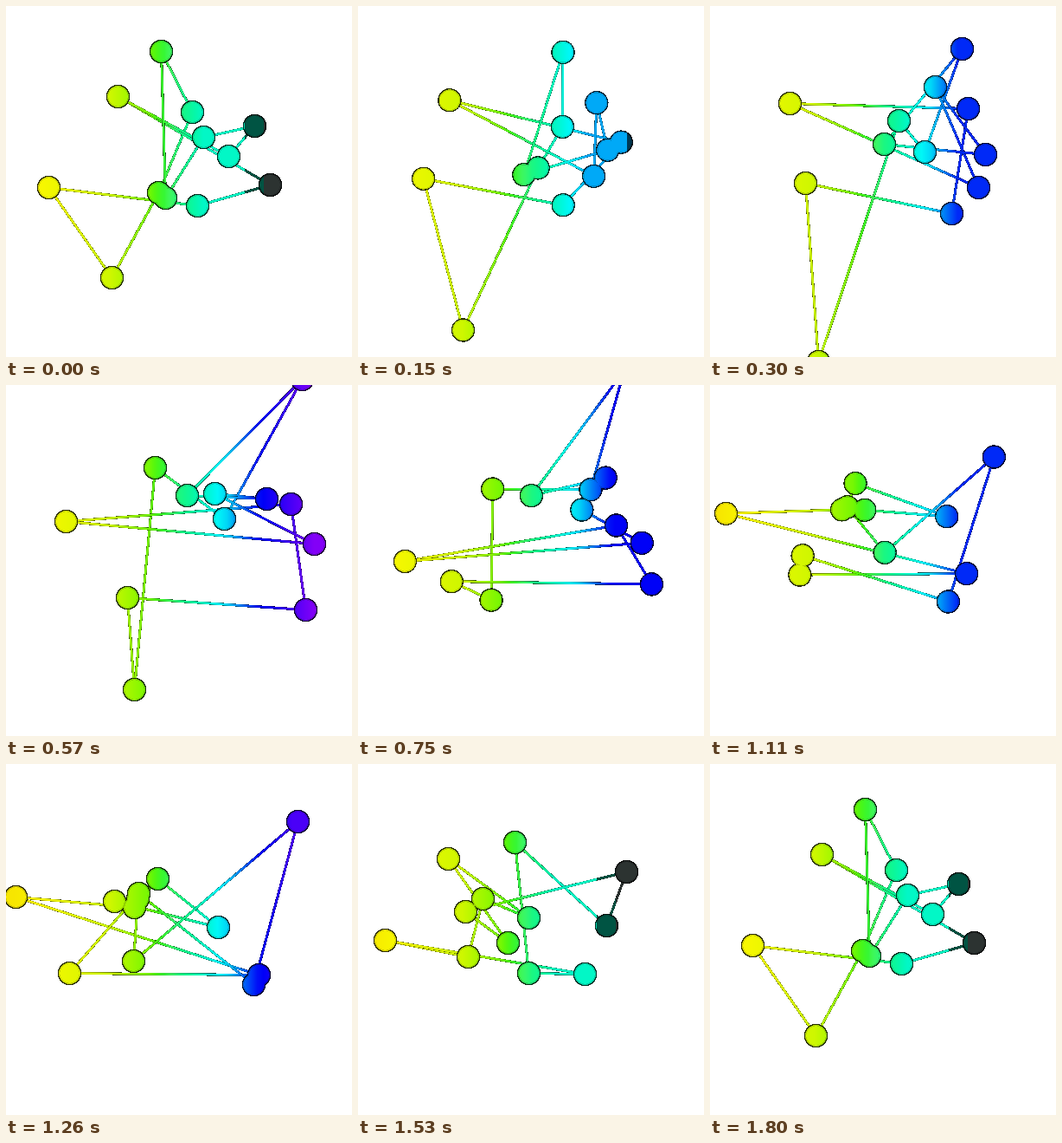
Animation, 400 px wide and 405 px high, one loop 1830 ms. Source, as a matplotlib script:

```python
import numpy as np
import matplotlib.pyplot as plt
from matplotlib.animation import FuncAnimation
from matplotlib.colors import hsv_to_rgb

W, H, DPI = 400, 405, 100
STEPS, MS = 60, 30
BALL, RIM, ROD = 13.7, 1.3, 1.55

# Key times as fractions of the cycle, and where each joint of the chain is.
KEYS = np.array([0, 10, 19, 32, 42, 51]) / STEPS
JOINTS = [
    [(179, 52), (291, 49), (342, -7), (224, 42), (125, 158), (104, 109)],
    [(215, 122), (248, 168), (252, 154), (284, 117), (245, 188), (197, 177)],
    [(176, 215), (218, 132), (172, 95), (167, 147), (175, 132), (144, 155)],
    [(122, 313), (125, 410), (148, 351), (152, 154), (148, 165), (127, 222)],
    [(49, 209), (110, 204), (140, 245), (47, 171), (11, 153), (31, 203)],
    [(221, 230), (279, 239), (346, 259), (307, 200), (292, 243), (262, 242)],
    [(305, 206), (298, 118), (329, 137), (188, 190), (73, 241), (197, 241)],
    [(129, 104), (92, 112), (69, 157), (67, 223), (153, 149), (181, 90)],
    [(257, 173), (310, 209), (356, 183), (281, 218), (286, 254), (287, 186)],
    [(287, 138), (260, 93), (241, 125), (301, 120), (337, 66), (310, 124)],
    [(228, 151), (318, 171), (301, 131), (252, 136), (147, 227), (124, 170)],
    [(184, 221), (201, 159), (209, 127), (176, 134), (152, 155), (173, 206)],
]

# One rainbow across the stage; the highest hue it reaches varies over time.
HUE_X = [10, 120, 165, 200, 225, 255, 290, 356]
HUE = [56, 70, 92, 147, 166, 188, 236, 272]
TOP_HUE = [168, 230, 272, 202, 258, 168]


def kernel(d):
    k = np.arange(1, 9)
    return (np.cos(2 * np.pi * k * np.asarray(d)[..., None]) / k**5).sum(-1)


def fit(values):
    """Weights of a smooth periodic curve through the key values."""
    n = len(KEYS)
    a = np.ones((n + 1, n + 1))
    a[:n, :n] = kernel(KEYS[:, None] - KEYS)
    a[n, n] = 0
    return np.linalg.solve(a, np.vstack([values, np.zeros(values.shape[1])]))


N = len(JOINTS)
CURVES = fit(np.array(JOINTS, float).transpose(1, 0, 2).reshape(len(KEYS), -1))
YY, XX = np.mgrid[:H, :W].astype(float)
RAINBOW = np.interp(np.arange(W), HUE_X, HUE)


def pose(t):
    return (np.append(kernel(t - KEYS), 1) @ CURVES).reshape(N, 2)


def colours(t):
    """Colour per column; far past the top hue it drops to dark, then grey."""
    top = np.interp(t, KEYS, TOP_HUE, period=1)
    hue = np.minimum(RAINBOW, top)
    over = RAINBOW - top
    sat = 1 - 0.25 * np.exp(-(((hue - 128) / 22) ** 2))
    sat = np.where(over > 72, 0.12, sat)
    val = np.select([over > 72, over > 48], [0.2, 0.33], 0.97)
    return hsv_to_rgb(np.stack([hue / 360, sat, val], -1))


def window(lo, hi, pad):
    x0, y0 = np.maximum(np.floor(lo - pad), 0).astype(int)
    x1, y1 = np.maximum(np.ceil(hi + pad) + 1, 0).astype(int)
    return slice(y0, y1), slice(x0, x1)


def paint(img, box, inside, row, shade):
    lit = row[box[1]][None] * np.broadcast_to(shade, inside.shape)[..., None]
    img[box][inside] = lit[inside]


def rod(img, a, b, row):
    box = window(np.minimum(a, b), np.maximum(a, b), 3)
    dx, dy = b - a
    px, py = XX[box] - a[0], YY[box] - a[1]
    s = np.clip((px * dx + py * dy) / max(dx * dx + dy * dy, 1e-9), 0, 1)
    dist = np.hypot(px - s * dx, py - s * dy) / ROD
    shade = np.clip(0.15 + 0.95 * np.sqrt(np.clip(1 - dist**2, 0, 1)), 0, 1)
    paint(img, box, dist < 1, row, shade)


def disc(img, c, radius, row, shade):
    box = window(c, c, radius)
    inside = np.hypot(XX[box] - c[0], YY[box] - c[1]) < radius
    paint(img, box, inside, row, shade)


def render(frame):
    t = frame % STEPS / STEPS
    pts, row = pose(t), colours(t)
    img = np.ones((H, W, 3))
    for a, b in zip(pts, np.roll(pts, -1, axis=0)):
        rod(img, a, b, row)
    # Rims first, so that overlapping balls melt together.
    for radius, shade in ((BALL, 0.2), (BALL - RIM, 0.85), (BALL - 2 * RIM, 1)):
        for c in pts:
            disc(img, c, radius, row, shade)
    return img


fig = plt.figure(figsize=(W / DPI, H / DPI), dpi=DPI, facecolor="white")
ax = fig.add_axes([0, 0, 1, 1])
ax.axis("off")
view = ax.imshow(render(0), interpolation="nearest", aspect="auto")


def update(frame):
    view.set_data(render(frame))
    return [view]


anim = FuncAnimation(fig, update, frames=STEPS + 1, interval=MS,
                     repeat=True, repeat_delay=0, blit=False)
plt.show()
```
